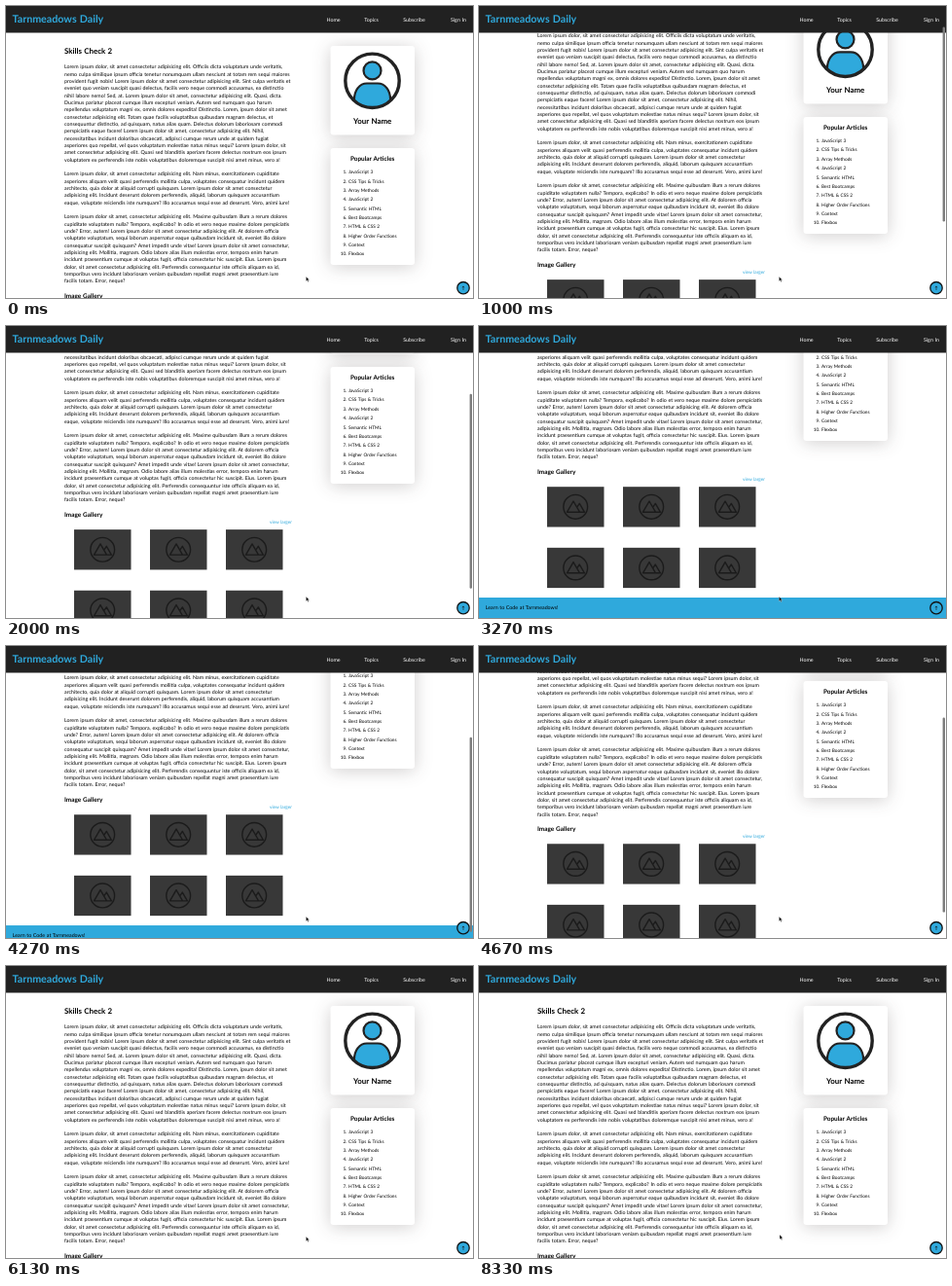
Recreate the animation shown at these times as an HTML page. Size 480x300 px, loop 8.67 s.

```html
<!DOCTYPE html>
<html lang="en">
<head>
<meta charset="utf-8">
<title>Tarnmeadows Daily</title>
<style>
  html, body { margin: 0; width: 100%; height: 100%; overflow: hidden; background: #fff; }
  svg { display: block; width: 480px; height: 300px; }
  text { font: 5.3px Lato, "Open Sans", sans-serif; word-spacing: .06em; fill: #000; text-rendering: geometricPrecision; }
  .bold { font-weight: 700; }
  .h1 { font-size: 10.7px; fill: #2fa9dc; }
  .h2 { font-size: 7.9px; }
  .h3 { font-size: 6.4px; }
  .small { font-size: 4.75px; }
  .link { fill: #2fa9dc; }
  .nav { fill: #fff; }
  .mid { text-anchor: middle; }
  .end { text-anchor: end; }
  .card { fill: #fff; filter: drop-shadow(0 2px 9px rgba(40, 30, 30, .22)); }
</style>
</head>
<body>
<svg viewBox="0 0 480 300">
  <defs>
    <clipPath id="inside"><circle cx="376.5" cy="76.8" r="27"/></clipPath>
    <g id="picture">
      <rect width="58.5" height="41.3" fill="#383838"/>
      <g fill="none" stroke="#1b1b1b" stroke-width="1.4" stroke-linejoin="round">
        <circle cx="29.2" cy="20.6" r="12.4"/>
        <path d="M20.5 26 L27 14.8 L33.5 26 Z M30.7 21 L33.3 17.2 L38.4 26 H33.5"/>
      </g>
    </g>
  </defs>

  <g id="page">
    <text class="bold h2" x="60" y="49.2">Skills Check 2</text>
    <g id="copy"></g>
    <text class="bold h3" x="60" y="300.2">Image Gallery</text>
    <text class="small link end" x="294" y="307.3">view larger</text>
    <g id="gallery"></g>

    <rect class="card" x="333.5" y="41" width="86.5" height="91.5" rx="3"/>
    <g stroke="#222" stroke-width="2.2">
      <g fill="#2fa9dc" clip-path="url(#inside)">
        <path d="M358 99 C357 86 364 79.5 371 79.5 H382 C389 79.5 396 86 395 99 Q376.5 110 358 99 Z"/>
        <circle cx="376.5" cy="66.4" r="9"/>
      </g>
      <circle cx="376.5" cy="76.8" r="27.7" fill="none" stroke-width="3.4"/>
    </g>
    <text class="bold h2 mid" x="376.7" y="121">Your Name</text>

    <rect class="card" x="333.5" y="146" width="86.5" height="120" rx="3"/>
    <text class="bold h3 mid" x="376.7" y="158.8">Popular Articles</text>
    <g id="articles"></g>

    <rect y="427" width="480" height="21" fill="#2fa9dc"/>
    <text x="6.8" y="439.4">Learn to Code at Tarnmeadows!</text>
  </g>

  <rect width="480" height="27.5" fill="#212121"/>
  <text class="bold h1" x="6.5" y="17.1">Tarnmeadows Daily</text>
  <g id="menu"></g>

  <g stroke="#111">
    <circle cx="470" cy="289.7" r="6.2" fill="#2fa9dc" stroke-width="1.3"/>
    <path d="M470 291.9 V288 M468.8 289.2 L470 287.9 L471.2 289.2" fill="none" stroke-width=".6"/>
  </g>
  <rect id="thumb" x="476.6" width="2.4" height="200" rx="1.2" fill="#7c7c7c"/>
  <path id="cursor" d="M0 0 V4.8 L1.1 3.8 L1.9 5.6 L2.7 5.2 L1.9 3.5 H3.4 Z" stroke="#fff" stroke-width=".3"/>
</svg>

<script>
const LOOP = 8670, FRAME = 1000 / 15, PAGE = 448, VIEW = 300;

const paragraphs = [
`Lorem ipsum dolor, sit amet consectetur adipisicing elit. Officiis dicta voluptatum unde veritatis,
nemo culpa similique ipsum officia tenetur nonumquam ullam nesciunt at totam rem sequi maiores
provident fugit nobis! Lorem ipsum dolor sit amet consectetur adipisicing elit. Sint culpa veritatis et
eveniet quo veniam suscipit quasi delectus, facilis vero neque commodi accusamus, ea distinctio
nihil labore nemo! Sed, at. Lorem ipsum dolor sit amet, consectetur adipisicing elit. Quasi, dicta.
Ducimus pariatur placeat cumque illum excepturi veniam. Autem sed numquam quo harum
repellendus voluptatum magni ex, omnis dolores expedita! Distinctio. Lorem, ipsum dolor sit amet
consectetur adipisicing elit. Totam quae facilis voluptatibus quibusdam magnam delectus, et
consequuntur distinctio, ad quisquam, natus alias quam. Delectus dolorum laboriosam commodi
perspiciatis eaque facere! Lorem ipsum dolor sit amet, consectetur adipisicing elit. Nihil,
necessitatibus incidunt doloribus obcaecati, adipisci cumque rerum unde at quidem fugiat
asperiores quo repellat, vel quos voluptatum molestiae natus minus sequi? Lorem ipsum dolor, sit
amet consectetur adipisicing elit. Quasi sed blanditiis aperiam facere delectus nostrum eos ipsum
voluptatem ex perferendis iste nobis voluptatibus doloremque suscipit nisi amet minus, vero a!`,
`Lorem ipsum dolor, sit amet consectetur adipisicing elit. Nam minus, exercitationem cupiditate
asperiores aliquam velit quasi perferendis mollitia culpa, voluptates consequatur incidunt quidem
architecto, quia dolor at aliquid corrupti quisquam. Lorem ipsum dolor sit amet consectetur
adipisicing elit. Incidunt deserunt dolorem perferendis, aliquid, laborum quisquam accusantium
eaque, voluptate reiciendis iste numquam? Illo accusamus sequi esse ad deserunt. Vero, animi iure!`,
`Lorem ipsum dolor sit amet, consectetur adipisicing elit. Maxime quibusdam illum a rerum dolores
cupiditate voluptatem nulla? Tempora, explicabo? In odio et vero neque maxime dolore perspiciatis
unde? Error, autem! Lorem ipsum dolor sit amet consectetur adipisicing elit. At dolorem officia
voluptate voluptatum, sequi laborum aspernatur eaque quibusdam incidunt sit, eveniet illo dolore
consequatur suscipit quisquam? Amet impedit unde vitae! Lorem ipsum dolor sit amet consectetur,
adipisicing elit. Mollitia, magnam. Odio labore alias illum molestias error, tempora enim harum
incidunt praesentium cumque at voluptas fugit, officia consectetur hic suscipit. Eius. Lorem ipsum
dolor, sit amet consectetur adipisicing elit. Perferendis consequuntur iste officiis aliquam ea id,
temporibus vero incidunt laboriosam veniam quibusdam repellat magni amet praesentium iure
facilis totam. Error, neque?`];

const articles = ["JavaScript 3", "CSS Tips & Tricks", "Array Methods", "JavaScript 2", "Semantic HTML",
  "Best Bootcamps", "HTML & CSS 2", "Higher Order Functions", "Context", "Flexbox"];
const menu = [["Home", 329.5], ["Topics", 368.3], ["Subscribe", 408.2], ["Sign In", 457]];

// [time, value] steps
const scrollSteps = [[533, 0], [667, 6], [1000, 32], [2000, 104], [2400, 133], [2667, 147], [2933, 148],
  [4067, 148], [4267, 140], [4667, 110], [5200, 58], [5500, 26], [5667, 8], [5800, 0]];
const thumbSteps = [[599, 0], [600, 1], [3000, 1], [3267, 0], [4132, 0], [4133, 1], [5800, 1], [6133, 0]];
const cursorSteps = [[7933, 0], [8333, 1]];

const $ = id => document.getElementById(id);

function add(parent, tag, attrs, content = "") {
  const el = document.createElementNS("http://www.w3.org/2000/svg", tag);
  for (const key in attrs) el.setAttribute(key, attrs[key]);
  el.textContent = content;
  $(parent).append(el);
}

function at(steps, t) {
  const i = steps.findIndex(step => step[0] > t);
  if (i < 0) return steps[steps.length - 1][1];
  if (i === 0) return steps[0][1];
  const [t0, a] = steps[i - 1], [t1, b] = steps[i];
  return a + (b - a) * (t - t0) / (t1 - t0);
}

paragraphs.join("\n\n").split("\n").forEach((line, i) =>
  add("copy", "text", { x: 60, y: 64.4 + i * 7.335 }, line));

articles.forEach((name, i) => {
  const y = 172.2 + i * 9.35;
  add("articles", "text", { x: 350.3, y, class: "small end" }, `${i + 1}.`);
  add("articles", "text", { x: 352, y, class: "small" }, name);
});

for (let i = 0; i < 6; i++)
  add("gallery", "use", { href: "#picture", x: 70 + i % 3 * 78, y: 313.2 + Math.floor(i / 3) * 62.6 });

menu.forEach(([name, x]) => add("menu", "text", { x, y: 15.8, class: "nav" }, name));

function draw(now) {
  const t = Math.floor((now % LOOP + 5) / FRAME) * FRAME + 1;
  const scroll = at(scrollSteps, t), nudge = at(cursorSteps, t);
  $("page").setAttribute("transform", `translate(0 ${-scroll})`);
  $("thumb").setAttribute("y", scroll * VIEW / PAGE);
  $("thumb").setAttribute("opacity", at(thumbSteps, t));
  $("cursor").setAttribute("transform", `translate(${308.4 + nudge * .6} ${278 - nudge * 2})`);
}

const start = performance.now();
function tick() {
  draw(performance.now() - start);
  requestAnimationFrame(tick);
}
tick();
</script>
</body>
</html>
```
